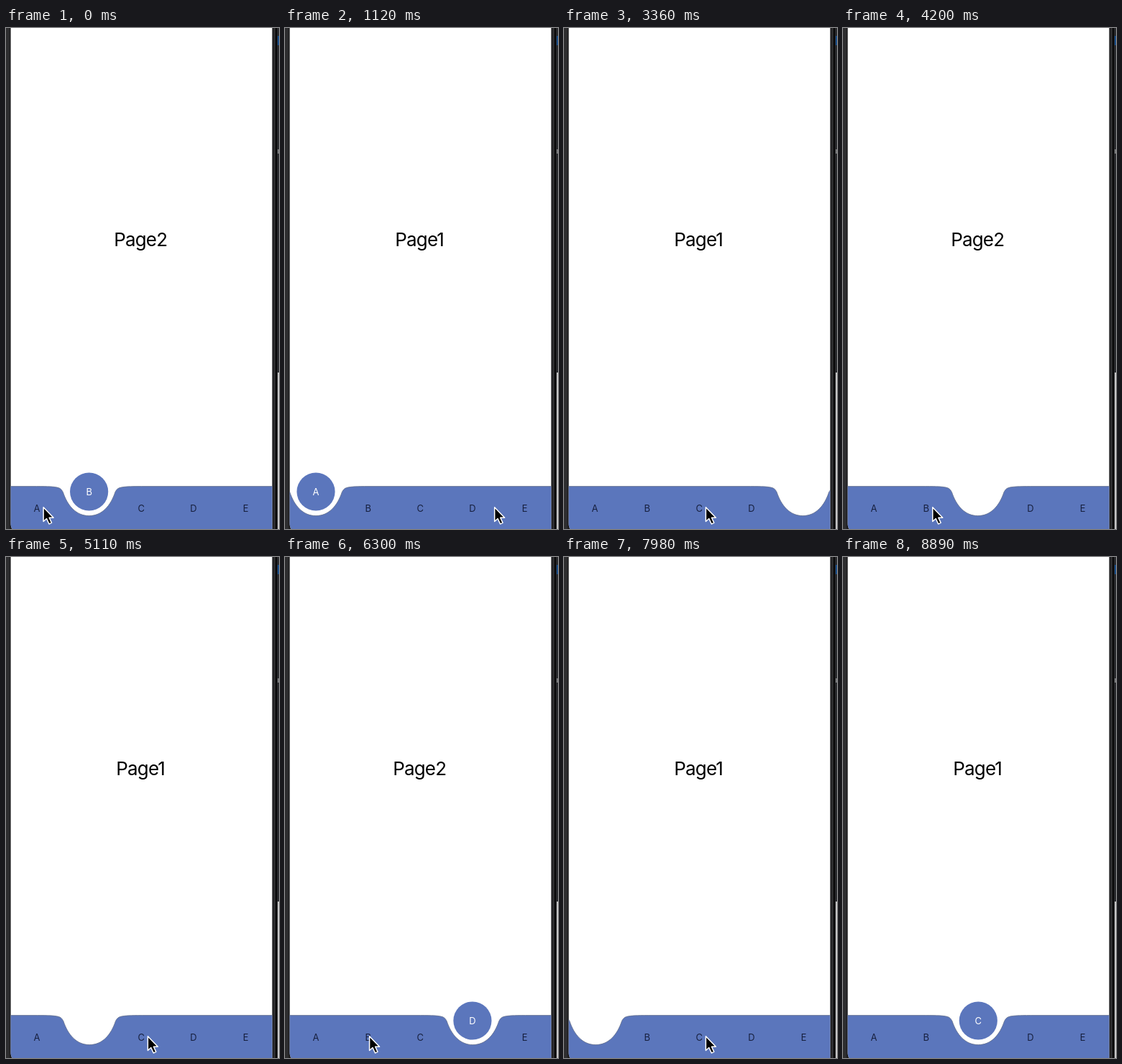
An HTML page that plays this animation: 380 px wide and 698 px high, repeating every 8.96 s.

```html
<!DOCTYPE html>
<html lang="en">
<head>
<meta charset="utf-8">
<title>Curved tab bar</title>
<style>
  html, body { margin: 0; width: 100%; height: 100%; overflow: hidden; background: #2d2d2f; }
  svg { display: block; width: 380px; height: 698px; }
  text { font-family: Inter, Roboto, sans-serif; text-anchor: middle; }
  .page { font-size: 26px; letter-spacing: -.85px; }
  .tab { font-size: 13px; fill: #17203f; }
  .ball text { font-size: 13px; fill: #fff; }
</style>
</head>
<body>
<svg viewBox="0 0 380 698">
  <defs>
    <clipPath id="screen"><path d="M6.6 0H370.5V698H9Q6.6 696 6.6 690Z"/></clipPath>
  </defs>
  <rect width="380" height="698" fill="#2d2d2f"/>
  <rect x="5" width="2" height="698" fill="#1b1b1d"/>
  <rect x="370.5" width="1.5" height="698" fill="#161618"/>
  <rect x="375" width="2.5" height="698" fill="#080809"/>
  <rect x="377.5" width="2.5" height="698" fill="#28292c"/>
  <rect x="378.3" y="480" width="1.7" height="218" fill="#d8d8d8"/>
  <rect x="378" y="11" width="2" height="13" fill="#164a86"/>
  <rect x="378" y="169" width="2" height="6" fill="#77787a"/>
  <g clip-path="url(#screen)">
    <rect width="380" height="698" fill="#fff"/>
    <text class="page" id="page" x="187.2" y="303.8"></text>
    <path id="bar" fill="#5b76bc" stroke="#66718c" stroke-width=".8"/>
    <g id="tabs"></g>
    <g class="ball" id="ball">
      <circle r="26.6" fill="#5b76bc"/>
      <text id="ballText" y="4.7"></text>
    </g>
  </g>
  <path id="cursor" d="M.6 .8V20.5L5 16.5L8.5 24L12 22.4L8.7 15.2H14.6Z"
        fill="#000" stroke="#fff" stroke-width="1.5" stroke-linejoin="round"/>
</svg>
<script>
const LOOP = 8960;
const LABELS = [...'ABCDE'];
const BAR_TOP = 638.6, BALL_Y = 646, BALL_DROP = 84, NOTCH_DELAY = 135;
const POINTER_Y = 667, POINTER_MAX_X = 309, OFFSTAGE_X = 450;

// Tabs pressed in turn, and when; the loop opens with B selected.
const PRESSED = [...'BAECBCDAC'].map(label => LABELS.indexOf(label));
const PRESS_TIMES = [-1000, 70, 1890, 3220, 4060, 4970, 5880, 6790, 7840];

const $ = id => document.getElementById(id);
const clamp = v => Math.min(1, Math.max(0, v));
const span = (t, a, b) => clamp((t - a) / (b - a));
const smooth = u => u * u * (3 - 2 * u);
const easeOut = u => 1 - (1 - u) ** 3;
const lerp = (a, b, u) => a + (b - a) * u;
const tabX = i => 43 + 72.65 * i;
const aimX = i => i === undefined ? OFFSTAGE_X : Math.min(tabX(i) + 8.5, POINTER_MAX_X);

// Damped spring from 0 to 1 with a slight overshoot.
function spring(ms) {
  const s = Math.max(0, ms) / 1000, damping = 18, frequency = 11.6;
  const phase = frequency * s;
  return 1 - Math.exp(-damping * s) * (Math.cos(phase) + damping / frequency * Math.sin(phase));
}

const tabs = LABELS.map((label, i) => {
  const node = document.createElementNS('http://www.w3.org/2000/svg', 'text');
  node.setAttribute('class', 'tab');
  node.setAttribute('x', tabX(i));
  node.setAttribute('y', 673.6);
  node.textContent = label;
  $('tabs').append(node);
  return node;
});

function barPath(c) {
  const p = (dx, dy) => `${c + dx} ${BAR_TOP + dy}`;
  return `M-90 ${BAR_TOP}L${p(-73, 0)}` +
    `C${p(-41, 0)} ${p(-40, 1.5)} ${p(-36.3, 8)}` +
    `C${p(-30, 27)} ${p(-18, 41)} ${p(0, 41)}` +
    `C${p(18, 41)} ${p(30, 27)} ${p(36.3, 8)}` +
    `C${p(40, 1.5)} ${p(41, 0)} ${p(73, 0)}` +
    `L470 ${BAR_TOP}V710H-90Z`;
}

function draw(t) {
  const n = PRESS_TIMES.findLastIndex(time => time <= t);
  const start = PRESS_TIMES[n], next = PRESS_TIMES[n + 1] ?? LOOP;
  const to = PRESSED[n], from = PRESSED[n - 1] ?? to;
  const dt = t - start;

  // The ball sinks, the notch slides across, then the ball rises.
  const notch = lerp(tabX(from), tabX(to), spring(dt - NOTCH_DELAY));
  const sinking = dt < 200;
  const shown = sinking ? from : to;
  const hidden = sinking ? smooth(span(dt, 0, 125)) : 1 - smooth(span(dt, 265, 415));

  // The pointer rests, then heads for the next tab well before pressing it.
  const travel = easeOut(span(dt / (next - start), .316, .76));
  const pointerX = lerp(aimX(to), aimX(PRESSED[n + 1]), travel);

  $('page').textContent = 'Page' + (to % 2 + 1);
  $('bar').setAttribute('d', barPath(notch));
  $('ball').setAttribute('transform', `translate(${tabX(shown)} ${BALL_Y + BALL_DROP * hidden})`);
  $('ballText').textContent = LABELS[shown];
  tabs.forEach((node, i) => node.setAttribute('opacity', clamp(Math.abs(notch - tabX(i)) / 66 - .08)));
  $('cursor').setAttribute('transform', `translate(${pointerX} ${POINTER_Y})`);
}

const begin = performance.now();
function tick() {
  draw((performance.now() - begin) % LOOP);
  requestAnimationFrame(tick);
}
tick();
</script>
</body>
</html>
```
